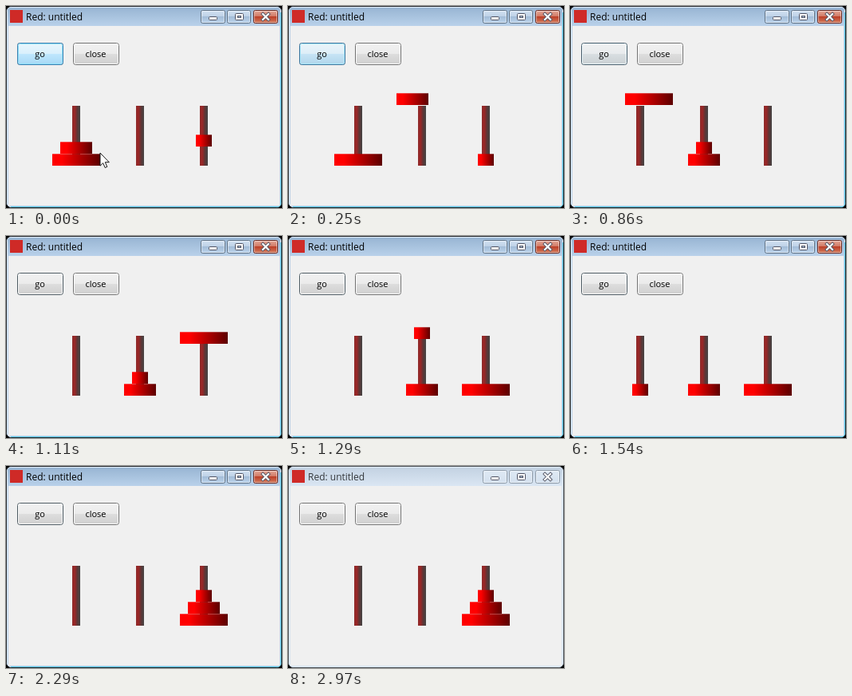
These frames come from a looping animation (346 px wide and 253 px high, 3.07 s). An HTML page:

```html
<!DOCTYPE html>
<html>
<head>
<meta charset="utf-8">
<title>Towers of Hanoi</title>
<style>
html, body { margin: 0; width: 100%; height: 100%; overflow: hidden; background: #000; }
svg { display: block; width: 346px; height: 253px; }
text { font-family: "Open Sans", "Noto Sans", sans-serif; fill: #000; }
</style>
</head>
<body>
<svg viewBox="0 0 346 253">
  <defs>
    <linearGradient id="disc"><stop stop-color="#f00"/><stop offset=".2" stop-color="#f00"/><stop offset="1" stop-color="#5c0000"/></linearGradient>
    <linearGradient id="peg"><stop stop-color="#8c2a2a"/><stop offset=".3" stop-color="#9c2626"/><stop offset=".65" stop-color="#5c3636"/><stop offset="1" stop-color="#444"/></linearGradient>
    <linearGradient id="bar" x2="0" y2="1"><stop stop-color="#98b5d3"/><stop offset="1" stop-color="#b9d1ea"/></linearGradient>
    <linearGradient id="barOff" x2="0" y2="1"><stop stop-color="#c3d2e2"/><stop offset="1" stop-color="#dae6f3"/></linearGradient>
    <linearGradient id="cap" x2="0" y2="1"><stop stop-color="#d3e2f2"/><stop offset=".45" stop-color="#bfd2e7"/><stop offset=".5" stop-color="#a4bdd8"/><stop offset="1" stop-color="#bcd4ec"/></linearGradient>
    <linearGradient id="capOff" x2="0" y2="1"><stop stop-color="#dfe9f4"/><stop offset="1" stop-color="#d3e0ee"/></linearGradient>
    <linearGradient id="red" x2="0" y2="1"><stop stop-color="#e5aa9b"/><stop offset=".45" stop-color="#d27b67"/><stop offset=".5" stop-color="#bd4029"/><stop offset="1" stop-color="#d37c5c"/></linearGradient>
    <linearGradient id="face" x2="0" y2="1"><stop stop-color="#f2f2f2"/><stop offset=".48" stop-color="#ebebeb"/><stop offset=".52" stop-color="#dddddd"/><stop offset="1" stop-color="#cfcfcf"/></linearGradient>
    <linearGradient id="hot" x2="0" y2="1"><stop stop-color="#eaf6fd"/><stop offset=".48" stop-color="#d9f0fc"/><stop offset=".52" stop-color="#bee6fd"/><stop offset="1" stop-color="#a7d9f5"/></linearGradient>
  </defs>

  <rect id="frame" x=".5" y=".5" width="345" height="252" rx="6"/>
  <rect id="rim" x="1.5" y="1.5" width="343" height="250" rx="5" fill="none" stroke="#e6f2fb"/>
  <path id="glow" d="M344.5 8V247Q344.5 251.5 340 251.5H6" fill="none" stroke="#5fd3ee"/>
  <rect x="3" y="25" width="340" height="225" fill="#f0f0f0"/>
  <rect x="5" y="5" width="16" height="16" fill="#cf2a27"/>
  <text id="title" x="25" y="17.5" font-size="12">Red: untitled</text>
  <g id="caps"></g>
  <g id="buttons"></g>
  <g id="pegs"></g>
  <g id="discs"></g>
  <path id="cursor" d="M118 184v16.2l3.7-3.5 2.5 5.8 2.6-1.1-2.5-5.7h5z" fill="#fff" stroke="#000" stroke-width=".9"/>
</svg>
<script>
const LOOP = 3070, TOP = 109, BASE = 185, H = 15;
const $ = id => document.getElementById(id);

function add(parent, tag, attrs) {
  const el = document.createElementNS("http://www.w3.org/2000/svg", tag);
  for (const k in attrs) el.setAttribute(k, attrs[k]);
  parent.appendChild(el);
  return el;
}
const box = (parent, x, y, width, height, attrs) =>
  add(parent, "rect", { x, y, width, height, ...attrs });

// Title bar buttons
const caps = [[244.5, 30], [277.5, 29], [310.5, 30]].map(([x, w]) => {
  const el = box($("caps"), x, 5.5, w, 16, { rx: 2 });
  box($("caps"), x + 1, 6.5, w - 2, 14, { rx: 1, fill: "none", stroke: "#fff", "stroke-opacity": .45 });
  return el;
});
const glyph = { fill: "#fff", stroke: "#535666", "stroke-width": 1 };
box($("caps"), 254.5, 13.5, 10, 4, { ...glyph, rx: 1 });
box($("caps"), 287.5, 9.5, 10, 8, { ...glyph, rx: 1 });
box($("caps"), 290.5, 12.5, 4, 2, { ...glyph, fill: "#a9bfd6" });
for (const [stroke, w] of [["#535666", 4], ["#fff", 2.2]])
  add($("caps"), "path", { d: "M322 10l7 7m0-7l-7 7", stroke, "stroke-width": w, "stroke-linecap": "square" });

// Push buttons
function button(x, label) {
  const g = $("buttons");
  const edge = box(g, x + .5, 46.5, 57, 27, { rx: 3, fill: "url(#face)", stroke: "#707070" });
  box(g, x + 1.5, 47.5, 55, 25, { rx: 2, fill: "none", stroke: "#fcfcfc" });
  const hot = add(g, "g", { opacity: 0 });
  box(hot, x + .5, 46.5, 57, 27, { rx: 3, fill: "url(#hot)", stroke: "#3c7fb1" });
  box(hot, x + 1.5, 47.5, 55, 25, { rx: 2, fill: "none", stroke: "#8ee0f8" });
  add(g, "text", { x: x + 28.5, y: 64, "font-size": 11, "text-anchor": "middle" }).textContent = label;
  return { edge, hot };
}
const go = button(14, "go");
button(84, "close");

// Pegs and discs, size 0 is the smallest
const pegX = p => 88 + 80 * p;
for (let p = 0; p < 3; p++) box($("pegs"), pegX(p) - 5, 125, 10, 75, { fill: "url(#peg)" });
const discs = [0, 1, 2].map(s =>
  box($("discs"), 0, 0, 20 + 20 * s, H - .3, { fill: "url(#disc)" }));

function solve(n, from, to, via, out = []) {
  if (n < 0) return out;
  solve(n - 1, from, via, to, out);
  out.push([n, from, to]);
  return solve(n - 1, via, to, from, out);
}

// Each move goes up, across and down
const towers = [[2, 1, 0], [], []];
const moves = solve(2, 0, 2, 1).map(([disc, from, to]) => {
  const y0 = BASE - H * (towers[from].length - 1);
  const y1 = BASE - H * towers[to].length;
  towers[to].push(towers[from].pop());
  const up = y0 - TOP, across = 80 * Math.abs(to - from), down = y1 - TOP;
  return { disc, from, to, y0, y1, up, across, len: up + across + down };
});

function place(travel) {
  const pos = [0, 1, 2].map(s => [pegX(0), BASE - H * (2 - s)]);
  for (const m of moves) {
    if (travel <= 0) break;
    const d = Math.min(travel, m.len);
    const k = Math.max(0, Math.min(1, (d - m.up) / m.across));
    const x = pegX(m.from) + (pegX(m.to) - pegX(m.from)) * k;
    const y = d < m.up ? m.y0 - d : TOP + Math.max(0, d - m.up - m.across);
    pos[m.disc] = [x, y];
    travel -= m.len;
  }
  pos.forEach(([x, y], s) => {
    discs[s].setAttribute("x", Math.round(x) - 10 - 10 * s);
    discs[s].setAttribute("y", Math.round(y) + .3);
  });
}

// Redraw times come in four bursts of nine
const ticks = [];
for (const [a, b] of [[60, 550], [610, 1110], [1170, 1660], [1730, 2230]])
  for (let i = 0; i < 9; i++) ticks.push(Math.floor((a + (b - a) * i / 8) / 10) * 10);
ticks.push(2290);

// Distance travelled at certain ticks
const pace = [[0, 258], [9, 602], [18, 963], [25, 1245], [30, 1461], [36, 1738], [37, 1744]];
function travelAt(n) {
  const i = Math.max(1, pace.findIndex(p => p[0] >= n));
  const [n0, d0] = pace[i - 1], [n1, d1] = pace[i];
  return d0 + (d1 - d0) * (n - n0) / (n1 - n0);
}

function setActive(on) {
  const set = (el, fill, stroke) => {
    el.setAttribute("fill", fill);
    el.setAttribute("stroke", stroke);
  };
  set($("frame"), on ? "#b9d1ea" : "#dae6f3", on ? "#22272d" : "#4c5157");
  $("glow").setAttribute("opacity", on ? 1 : 0);
  set(bar, on ? "url(#bar)" : "url(#barOff)", "none");
  caps.forEach((el, i) => set(el,
    on ? (i == 2 ? "url(#red)" : "url(#cap)") : "url(#capOff)",
    on ? (i == 2 ? "#6b2a22" : "#5f7286") : "#8d9aa8"));
  $("title").setAttribute("fill-opacity", on ? 1 : .75);
  go.edge.setAttribute("stroke", on ? "#4d5a62" : "#707070");
}
const bar = box($("caps").parentNode, 2, 2, 342, 23, { rx: 4 });
$("rim").after(bar);

function draw(t) {
  const n = ticks.filter(k => k <= t).length;
  const on = t < 2970;
  place(travelAt(n));
  setActive(on);
  go.hot.setAttribute("opacity", on ? Math.max(0, 1 - n / 16) : 0);
  $("cursor").setAttribute("visibility", n ? "hidden" : "visible");
}

const start = performance.now();
function loop() {
  draw((performance.now() - start) % LOOP);
  requestAnimationFrame(loop);
}
loop();
</script>
</body>
</html>
```
